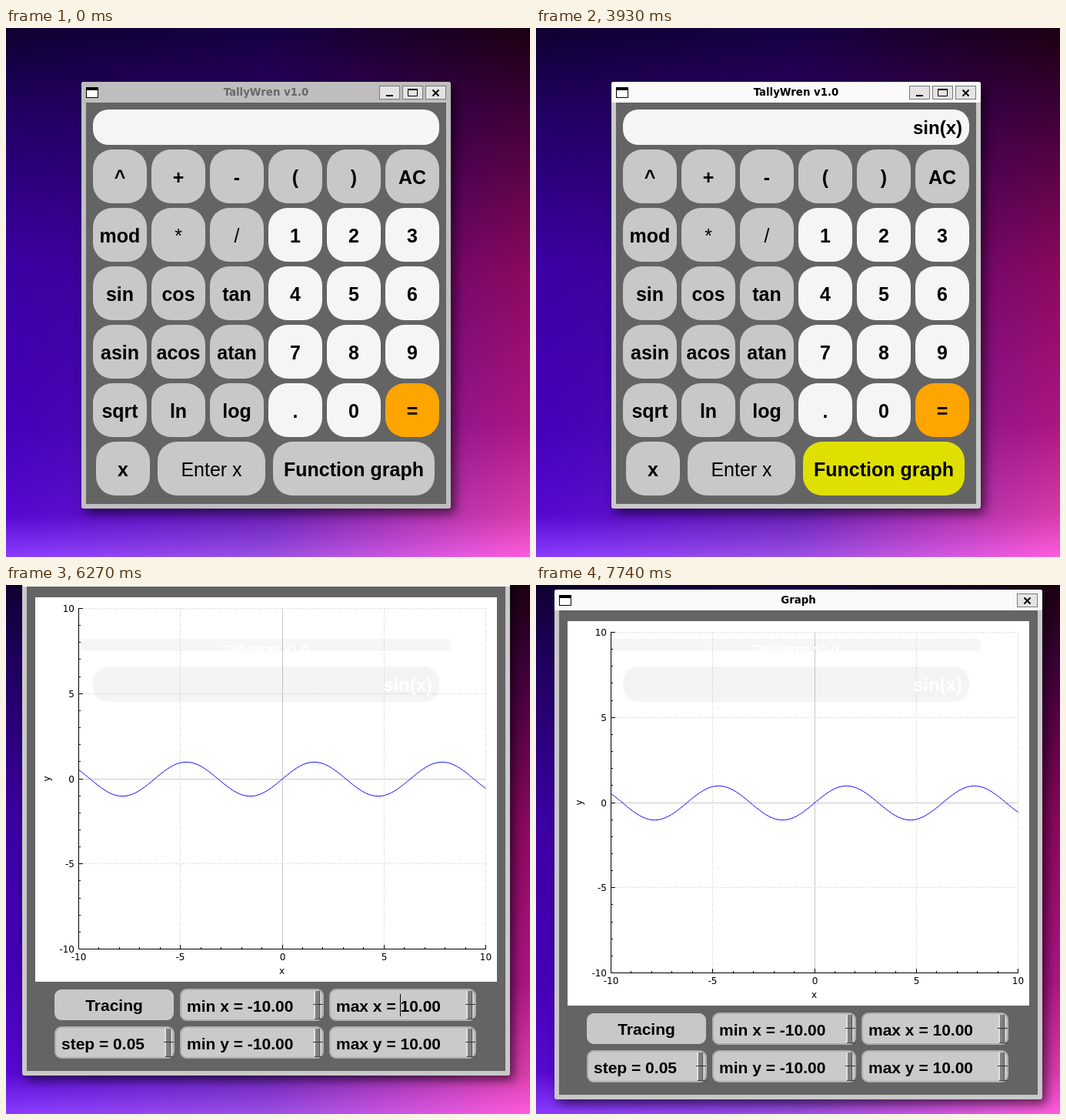
Animation of 681 by 688 pixels, one loop 8 s. Source, as an HTML page:

```html
<!DOCTYPE html>
<html lang="en">
<head>
<meta charset="utf-8">
<title>Calculator</title>
<style>
html, body { margin: 0; width: 100%; height: 100%; overflow: hidden; }
body { position: relative; background: linear-gradient(#150042, #28005c 12%, #4a0c98 60%, #6820b4 92%, #9a50e4); }
.side { position: absolute; inset: 0; }
.left {
  background: linear-gradient(#0f0030, #1f0060 15%, #3c00a4 45%, #4400b8 75%, #5608d0 92%, #8a3cff);
  mask-image: linear-gradient(90deg, #000, transparent 50%);
}
.right {
  background: linear-gradient(#1c0010, #3c0036 15%, #8a085c 45%, #ac1680 75%, #d83ca8 92%, #ff5cdc);
  mask-image: linear-gradient(270deg, #000, transparent 50%);
}
svg { position: absolute; inset: 0; display: block; }
text { white-space: pre; }
.win { filter: drop-shadow(5px 6px 7px rgba(0, 0, 0, .6)); }
.title { font: bold 13.33px "DejaVu Sans", sans-serif; text-anchor: middle; }
.key { font: bold 25px "Liberation Sans", sans-serif; text-anchor: middle; }
.thin { font-weight: 400; }
.entry { font: bold 24px "Liberation Sans", sans-serif; text-anchor: end; }
.spin { font: bold 21px "Liberation Sans", sans-serif; }
.tick { font: 12px "DejaVu Sans", sans-serif; }
.mid { text-anchor: middle; }
.end { text-anchor: end; }
.idle .frame { fill: #bfbfbf; }
.idle .bar { fill: #bebebe; }
.idle .title { fill: #686868; }
.frame { fill: #c9c9c9; }
.bar { fill: #fafafa; }
</style>
</head>
<body>
<div class="side left"></div>
<div class="side right"></div>
<svg id="stage" width="681" height="688"></svg>
<script>
const NAME = 'TallyWren v1.0';
const GREY = '#c8c8c8', WHITE = '#f5f5f5', HOVER = '#e0e0e0';

const rect = (x, y, w, h, fill, r = 0, more = '') =>
  `<rect x="${x}" y="${y}" width="${w}" height="${h}" rx="${r}" fill="${fill}" ${more}/>`;
const text = (x, y, str, cls, more = '') =>
  `<text x="${x}" y="${y}" class="${cls}" ${more}>${str}</text>`;
const path = (d, stroke, width = 1, more = '') =>
  `<path d="${d}" fill="none" stroke="${stroke}" stroke-width="${width}" ${more}/>`;

// Window frame with its top left corner at 0,0
function frame(w, h, title, glyphs) {
  const buttons = glyphs.map((glyph, i) => {
    const x = w - 33 - 30 * (glyphs.length - 1 - i);
    return rect(x + .5, 5.5, 26, 17, '#e4e4e4', 0, 'stroke="#777"') +
      `<g transform="translate(${x})">${glyph}</g>`;
  }).join('');
  return rect(0, 0, w, h, '', 3, 'class="frame"') +
    rect(0, 0, w, 27, '', 3, 'class="bar"') +
    rect(6, 27, w - 12, h - 33, '#646464') +
    rect(6.5, 7.5, 15, 13, '#fff', 0, 'stroke="#000"') + rect(6, 7, 16, 4, '#000') +
    text(w / 2, 18, title, 'title') + buttons;
}

const MINIMISE = rect(9, 17, 9, 2, '#000');
const MAXIMISE = path('M7.5 10V18.5H19.5V10', '#000') + rect(7, 9, 13, 2, '#000');
const CLOSE = path('M9.5 10.5l8 8m0 -8l-8 8', '#000', 2);

function key(label, x, y, w, fill, id, thin) {
  return rect(x, y, w, 70, fill, 25, `id="${id}"`) +
    text(x + w / 2, y + 45, label, thin ? 'key thin' : 'key');
}

function calculator() {
  const labels = ('^ + - ( ) AC mod * / 1 2 3 sin cos tan 4 5 6 ' +
    'asin acos atan 7 8 9 sqrt ln log . 0 =').split(' ');
  const keys = labels.map((label, i) => {
    const fill = label === '=' ? '#ffa500' : /^[\d.]$/.test(label) ? WHITE : GREY;
    return key(label, 113 + i % 6 * 76, 158 + Math.floor(i / 6) * 76, 70, fill,
      'key' + i, '*/'.includes(label));
  }).join('');
  return `<g transform="translate(98 70)">${frame(480, 555, NAME, [MINIMISE, MAXIMISE, CLOSE])}</g>` +
    rect(113, 106, 450, 46, WHITE, 20) +
    text(554, 138, '', 'entry', 'id="entry"') +
    rect(554, 112, 1, 34, '#000', 0, 'id="caret"') + keys +
    key('x', 117, 538, 70, GREY, 'keyX') +
    key('Enter x', 197, 538, 140, GREY, 'keyEnter', true) +
    key('Function graph', 347, 538, 210, GREY, 'keyGraph');
}

function plot() {
  const px = v => 321 + 26.45 * v, py = v => 236 - 22.15 * v;
  const snap = v => Math.floor(v) + .5;
  let out = rect(0, 0, 600, 500, '#fff'), ticks = '';
  for (let v = -10; v <= 10; v++) {
    const x = snap(px(v)), y = snap(py(v)), major = v % 5 === 0, len = major ? 5 : 2;
    ticks += `M${x} 457v${-len}M57 ${y}h${len}`;
    if (!major) continue;
    out += path(`M${x} 14V457M57 ${y}H586`, GREY, 1, v ? 'stroke-dasharray="1 2"' : '') +
      text(x, 472, v, 'tick mid') + text(51, y + 4.5, v, 'tick end');
  }
  const curve = Array.from({length: 401}, (_, i) => {
    const x = i / 20 - 10;
    return `${px(x).toFixed(2)} ${(py(Math.sin(x)) + .5).toFixed(2)}`;
  });
  return out + path('M56.5 14V457.5H586' + ticks, '#000') +
    path('M' + curve.join('L'), '#00f') +
    text(320.5, 490, 'x', 'tick mid') +
    text(0, 0, 'y', 'tick mid', 'transform="translate(19 236) rotate(-90)"');
}

function spin(label, x, y, w) {
  const r = x + w;
  return rect(x + 1, y + 1, w - 2, 40, '#cacaca', 8, 'stroke="#adadad" stroke-width="2"') +
    rect(r - 13, y + 3, 2, 36, '#e0e0e0') + rect(r - 11, y + 3, 5, 36, '#808080') +
    rect(r - 6, y + 3, 1, 36, '#555') +
    rect(r - 14, y + 20, 13, 1, '#333') + rect(r - 12, y + 39, 11, 1, '#444') +
    text(x + 9, y + 30, label, 'spin');
}

// Coordinates inside are relative to the plot area
function graph() {
  return `<g transform="translate(-17 -41)">${frame(634, 663, 'Graph', [CLOSE])}</g>` + plot() +
    rect(25, 510, 155, 40, GREY, 9) + text(102.5, 538, 'Tracing', 'spin mid') +
    spin('min x = -10.00', 188, 509, 187) + spin('max x = 10.00', 382, 509, 191) +
    spin('step = 0.05', 25, 558, 156) +
    spin('min y = -10.00', 188, 558, 187) + spin('max y = 10.00', 382, 558, 191) +
    rect(474, 516, 1, 29, '#000', 0, 'id="spinCaret"');
}

// Faint afterimage of the calculator that shows over the white plot
const afterimage = rect(98, 70, 480, 16, '#000', 2, 'opacity=".035"') +
  rect(113, 106, 450, 46, '#000', 20, 'opacity=".042"') +
  text(338, 88, NAME, 'title', 'fill="#fff"') + text(554, 138, 'sin(x)', 'entry', 'fill="#fff"');

stage.innerHTML = `<g id="calc" class="win">${calculator()}</g>` +
  `<g id="graphLayer"><g id="graphWin" class="win">${graph()}</g>${afterimage}</g>`;

const $ = id => document.getElementById(id);
const show = (id, on) => $(id).setAttribute('visibility', on ? 'inherit' : 'hidden');
const passed = (times, t) => times.filter(time => t >= time).length;

const OPEN = 4230;
const typed = [1230, 1320, 1410, 1650, 1830, 2430];
const caretFlips = [690, 1140, 1230, 3000, 3450, 3930];
const spinFlips = [OPEN, 4740, 5250, 5760, 6270, 6750, 7260, 7740];
const hovers = [['key11', 3050, 3100], ['key22', 3150, 3200], ['key28', 3200, 3250]];
const drag = [[6090, 22, -18], [6120, 24, -11], [6270, 38, 16], [6600, 45, 45], [6750, 41, 47]];

function dragged(t) {
  t = Math.floor(t / 30) * 30;
  const n = passed(drag.map(p => p[0]), t);
  const a = drag[Math.max(n - 1, 0)], b = drag[Math.min(n, drag.length - 1)];
  const k = a === b ? 0 : (t - a[0]) / (b[0] - a[0]);
  return [1, 2].map(i => Math.round(a[i] + (b[i] - a[i]) * k));
}

function draw() {
  const t = performance.now() % 8000;
  const active = t >= 690 && t < OPEN;
  $('calc').setAttribute('class', active ? 'win' : 'win idle');
  $('entry').textContent = 'sin(x)'.slice(0, passed(typed, t));
  show('caret', passed(caretFlips, t) % 2);
  for (const [id, from, to] of hovers) $(id).setAttribute('fill', t >= from && t < to ? HOVER : WHITE);
  $('keyGraph').setAttribute('fill', t >= 3300 && t < OPEN ? '#e0e000' : GREY);
  show('graphLayer', t >= OPEN);
  show('spinCaret', passed(spinFlips, t) % 2);
  $('graphWin').setAttribute('transform', `translate(${dragged(t)})`);
  requestAnimationFrame(draw);
}
draw();
</script>
</body>
</html>
```
